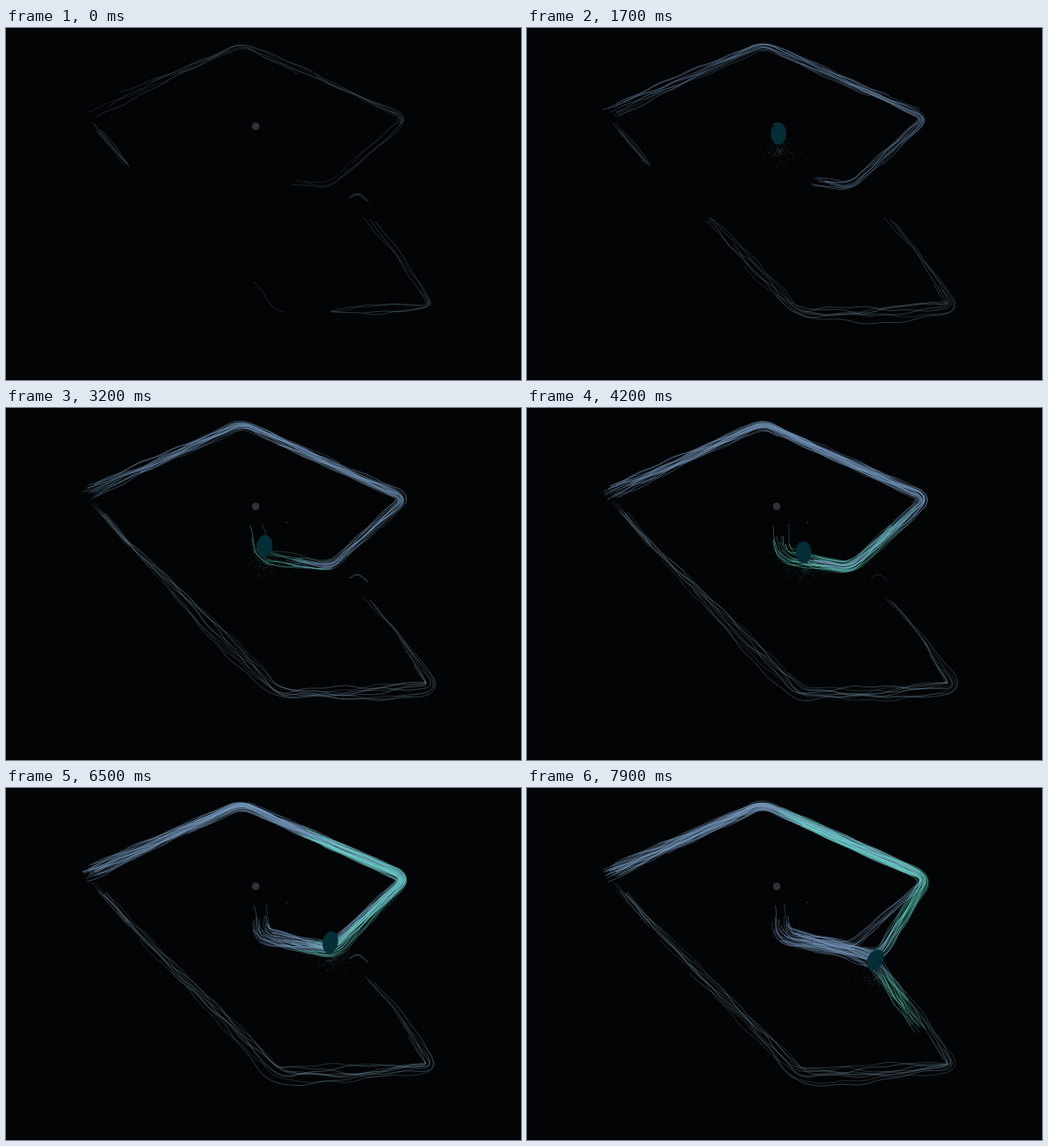
Animation of 559x383 px, one loop 8 s. Source, as an HTML page with a canvas:

```html
<!DOCTYPE html>
<html lang="en">
<head>
<meta charset="utf-8">
<title>Flowing strands</title>
<style>
  html, body { margin: 0; width: 100%; height: 100%; overflow: hidden; background: #020405; }
  canvas { display: block; width: 559px; height: 383px; }
</style>
</head>
<body>
<canvas id="stage" width="559" height="383"></canvas>
<script>
const ctx = document.getElementById('stage').getContext('2d');
const LOOP = 8000, TICK = 100, STEP = 3;
const BLUE = '122,156,192', TEAL = '104,226,204', PALE = '118,150,168';

function seeded(seed) {
  return () => {
    seed = (seed + 0x6D2B79F5) | 0;
    let n = Math.imul(seed ^ (seed >>> 15), 1 | seed);
    n = (n + Math.imul(n ^ (n >>> 7), 61 | n)) ^ n;
    return ((n ^ (n >>> 14)) >>> 0) / 4294967296;
  };
}
const clamp = (v, lo = 0, hi = 1) => Math.min(hi, Math.max(lo, v));
const mix = (a, b, k) => a + (b - a) * k;

// Piecewise linear keys: [time, value, ...]
function track(t, keys) {
  let i = 1;
  while (i < keys.length - 1 && t > keys[i][0]) i++;
  const a = keys[i - 1], b = keys[i], k = clamp((t - a[0]) / (b[0] - a[0]));
  return a.slice(1).map((v, j) => mix(v, b[j + 1], k));
}

// Evenly sampled, corner-rounded centre line; points are [x, y, half width]
function ribbon(points, radius = 4) {
  const raw = [];
  for (let i = 1; i < points.length; i++) {
    const a = points[i - 1], b = points[i];
    const n = Math.max(1, Math.round(Math.hypot(b[0] - a[0], b[1] - a[1]) / STEP));
    for (let j = 0; j < n; j++) raw.push(a.map((v, m) => mix(v, b[m], j / n)));
  }
  raw.push(points[points.length - 1]);
  const last = raw.length - 1;
  const soft = raw.map((_, i) => {
    const r = Math.min(radius, i, last - i), sum = [0, 0, 0];
    for (let j = i - r; j <= i + r; j++) for (let m = 0; m < 3; m++) sum[m] += raw[j][m];
    return sum.map(v => v / (2 * r + 1));
  });
  return soft.map(([x, y, w], i) => {
    const a = soft[Math.max(0, i - 1)], b = soft[Math.min(last, i + 1)];
    const dx = b[0] - a[0], dy = b[1] - a[1], len = Math.hypot(dx, dy) || 1;
    return { x, y, w, nx: -dy / len, ny: dx / len };
  });
}

function strands(count, seed) {
  const rnd = seeded(seed);
  return Array.from({ length: count }, () => ({
    lane: rnd() * 1.5 - 0.75,
    wave: 22 + rnd() * 30,
    phase: rnd() * 6.28,
    drift: (rnd() - 0.5) * 0.0016,
    u: rnd(), v: rnd(), light: 0.7 + rnd() * 0.5
  }));
}

function stroke(path, s, from, to, rgb, alpha, t, sway = 0.35) {
  const first = Math.max(0, Math.round(from / STEP));
  const end = Math.min(path.length - 1, Math.round(to / STEP));
  if (end - first < 2 || alpha <= 0) return;
  ctx.beginPath();
  for (let i = first; i <= end; i++) {
    const p = path[i], d = i * STEP;
    const o = p.w * (s.lane + sway * Math.sin(d / s.wave + s.phase + t * s.drift)
      + 0.1 * Math.sin(d / 7 + s.phase * 3 - t * 0.004));
    ctx.lineTo(p.x + p.nx * o, p.y + p.ny * o);
  }
  ctx.strokeStyle = `rgba(${rgb},${alpha * s.light})`;
  ctx.stroke();
}

const roof = ribbon([[276, 162, 5], [352, 174, 6], [434, 98, 6], [256, 17, 5], [85, 95, 8]]);
const floor = ribbon([[92, 100, 4], [135, 150, 5], [237, 253, 8], [295, 313, 9],
  [380, 311, 10], [465, 304, 6], [425, 245, 4], [378, 191, 3]]);
const arc = ribbon([[373, 185, 2], [382, 179, 2], [393, 189, 2]], 2);
const branch = ribbon([[276, 160, 8], [345, 176, 10], [380, 191, 9], [430, 264, 8]]);

const roofStrands = strands(46, 11);
const floorStrands = strands(9, 29);
const stubStrands = strands(5, 37);
const arcStrands = strands(2, 41);
const glowStrands = strands(26, 53);
const branchStrands = strands(22, 67);

function drawRoof(t) {
  const lo = 26, span = roof.length * STEP - lo;
  const retreat = track(t, [[6300, 0], [7700, 165]])[0];
  roofStrands.forEach((s, i) => {
    const birth = i < 10 ? -300 : (i - 9) * 125;
    const age = clamp((t - birth) / 400);
    const mid = lo + (i * 0.618 % 1) * span;
    const half = 95 + s.u * 90 + Math.max(0, t - birth) * 0.035;
    const start = lo + s.v * 25 + (i > 9 ? retreat : 0);
    stroke(roof, s, Math.max(start, mid - half), Math.min(lo + span - s.u * 18, mid + half),
      t < 900 ? PALE : BLUE, age * (0.44 + 0.14 * clamp(t / 2500)), t);
  });
}

function drawFloor(t) {
  const [start] = track(t, [[0, 350], [1700, 150], [3000, 20]]);
  const fill = 0.4 + 0.1 * clamp(t / 3000);
  floorStrands.forEach((s, i) => {
    const shown = i < 5 ? 1 : clamp((t - (i - 4) * 600) / 400);
    const from = start + s.u * 60 * (i % 3);
    const to = i < 3 ? 596 - s.v * 25 : 465 + s.v * 70;
    stroke(floor, s, from, to, PALE, fill * shown, t, 0.5);
  });
  stubStrands.forEach(s => stroke(floor, s, s.u * 18, 68 - s.v * 12, PALE, 0.45, t));
  stroke(floor, floorStrands[0], 250, 300, PALE, 0.35 * clamp(1 - t / 1200), t);
  const flicker = 0.22 + 0.18 * Math.cos(t * Math.PI / 1600);
  arcStrands.forEach(s => stroke(arc, s, 0, 30, PALE, flicker, t));
}

function drawGlow(t) {
  if (t < 2300) return;
  const [cx, cy] = track(t, [[5400, 352, 175], [6500, 356, 179], [7900, 382, 184]]);
  const path = ribbon([[273, 121, 11], [277, 161, 10], [cx, cy, 7],
    [434, 98, 6], [256, 17, 5], [85, 95, 7]]);
  const [head, tail] = track(t, [[2300, 10, 0], [3200, 120, 0], [4200, 212, 12],
    [5400, 292, 78], [6500, 360, 100], [7900, 428, 160]]);
  glowStrands.forEach((s, i) => {
    const alpha = 0.55 * clamp((t - 2300 - i * 100) / 350);
    const from = 4 + s.u * 28 + (i > 11 ? 20 : 0);
    const split = tail + (s.v - 0.5) * 70;
    const to = head - s.u * 42;
    stroke(path, s, from, Math.min(split, to), BLUE, alpha, t);
    stroke(path, s, Math.max(from, split), to, TEAL, alpha * (i % 3 ? 1 : 0.75), t);
  });
}

function drawBranch(t) {
  const [head] = track(t, [[5400, 20], [6500, 82], [7900, 200]]);
  branchStrands.forEach((s, i) => {
    const alpha = 0.5 * clamp((t - 5400 - i * 75) / 400);
    const to = head - s.u * 48;
    const split = track(t, [[6300, 45], [7900, 115]])[0] + s.v * 18;
    stroke(branch, s, s.v * 30, Math.min(split, to), BLUE, alpha, t);
    stroke(branch, s, split, to, TEAL, alpha, t);
  });
}

function drawGrains(t, x, y) {
  const rnd = seeded(900 + t);
  const dot = (px, py, rgb, a) => {
    ctx.fillStyle = `rgba(${rgb},${a})`;
    ctx.fillRect(px, py, 0.8, 0.8);
  };
  for (let i = 0; i < 160; i++) dot(66 + rnd() * 412, 130 + rnd() * 202, '90,115,120', 0.13);
  const power = clamp((t - 1000) / 600);
  if (!power) return;
  const rgb = t < 2500 ? '125,135,135' : '95,150,145';
  for (let i = 0; i < 420; i++) {
    const r = 40 * Math.pow(rnd(), 0.8), a = rnd() * 6.283;
    dot(x + 1 + Math.cos(a) * r, y + 19 + Math.sin(a) * r * 0.65, rgb,
      power * 0.34 * (1 - r / 44));
  }
}

function drawBlob(t, x, y) {
  const size = clamp((t - 900) / 500);
  if (!size) return;
  const [tilt] = track(t, [[5400, 0], [6500, 0.2], [7900, 0.5]]);
  ctx.fillStyle = '#042e36';
  ctx.beginPath();
  ctx.ellipse(x, y, 8.5 * size, 12 * size, tilt, 0, 7);
  ctx.fill();
}

function disc(x, y, r, color) {
  ctx.fillStyle = color;
  ctx.beginPath();
  ctx.arc(x, y, r, 0, 7);
  ctx.fill();
}

function draw(t) {
  ctx.fillStyle = '#020405';
  ctx.fillRect(0, 0, 559, 383);
  ctx.lineWidth = 0.7;
  ctx.lineJoin = 'round';
  const [x, y] = track(t, [[1300, 271, 107], [1700, 273, 115], [3200, 281, 150],
    [4200, 300, 157], [5400, 326, 163], [6500, 352, 168], [7900, 378, 187]]);
  drawGrains(t, x, y);
  drawRoof(t);
  drawFloor(t);
  drawGlow(t);
  drawBranch(t);
  disc(271, 107, 4, '#2f3335');
  if (t > 2400) disc(304.5, 124.5, 1, '#26383a');
  drawBlob(t, x, y);
}

let shown = -1;
function frame(now) {
  const t = Math.floor((now % LOOP) / TICK) * TICK;
  if (t !== shown) draw(shown = t);
  requestAnimationFrame(frame);
}
draw(0);
requestAnimationFrame(frame);
</script>
</body>
</html>
```
